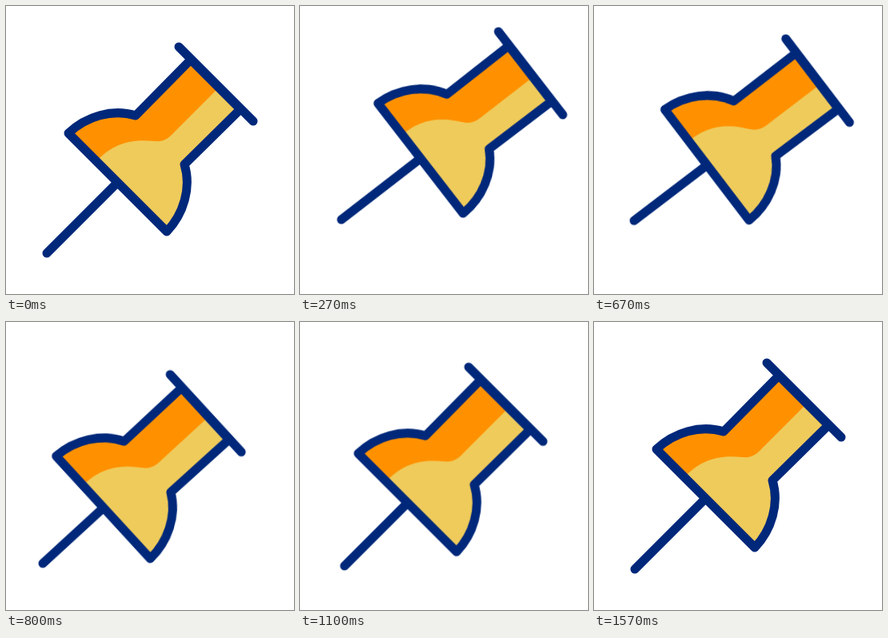
Animation of 360x360 px, one loop 2000 ms. Source, as an HTML page:

```html
<!DOCTYPE html>
<html lang="en">
<head>
<meta charset="utf-8">
<title>Push pin</title>
<style>
  html, body { margin: 0; height: 100%; overflow: hidden; background: #fff; }
  svg { display: block; width: 100vw; height: 100vh; }

  .line { fill: none; stroke: #00287a; stroke-width: 11; stroke-linecap: round; stroke-linejoin: round; }
  .spark { fill: none; stroke: #fcc550; stroke-width: 11; stroke-linecap: round; }

  .pin, .needle, .spark { animation: 2s linear infinite; }
  .pin { transform-origin: 180px 180px; animation-name: pin; }
  .needle { animation-name: needle; }
  .spark { animation-name: spark; }

  /* lift, strike, rebound, settle */
  @keyframes pin {
    0% { transform: translate(0, 0) rotate(0deg); animation-timing-function: cubic-bezier(.4, 0, .67, 1); }
    23.33%, 24% { transform: translate(27.3px, -42px) rotate(12.4deg); animation-timing-function: cubic-bezier(.36, 0, .64, 1); }
    46.67% { transform: translate(-27px, 26.5px) rotate(0deg); animation-timing-function: cubic-bezier(.33, 0, .67, 1); }
    63.33% { transform: translate(16px, -15.5px) rotate(0deg); animation-timing-function: cubic-bezier(.33, 0, .67, 1); }
    78.33%, 100% { transform: translate(0, 0) rotate(0deg); }
  }

  /* the needle slides up behind the body as it sinks in */
  @keyframes needle {
    0%, 24% { transform: translate(0, 0); animation-timing-function: cubic-bezier(.36, 0, .64, 1); }
    46.67% { transform: translate(20px, -19px); animation-timing-function: cubic-bezier(.33, 0, .67, 1); }
    63.33%, 100% { transform: translate(0, 0); }
  }

  @keyframes spark {
    0%, 43.99% { opacity: 0; stroke-dasharray: 0 200; stroke-dashoffset: 0; }
    44% { opacity: 1; stroke-dasharray: 0 200; stroke-dashoffset: 0; }
    46.5% { stroke-dasharray: 36 200; stroke-dashoffset: 0; }
    51% { stroke-dasharray: 40 200; stroke-dashoffset: -60; }
    54% { opacity: 1; stroke-dasharray: 0 200; stroke-dashoffset: -100; }
    54.01%, 100% { opacity: 0; stroke-dasharray: 0 200; stroke-dashoffset: -100; }
  }
</style>
</head>
<body>
<svg viewBox="0 0 360 360">
  <defs>
    <path id="body" d="M78 159C100 138 133 128 162 137L231 67L293 129L223 198C232 227 222 260 201 282Z"/>
  </defs>
  <path class="spark" pathLength="100" d="M36 318C34 303 29 272 38 250"/>
  <path class="spark" pathLength="100" d="M48 327C62 324 92 321 112 309"/>
  <g class="pin">
    <path class="line needle" d="M138 222L51 309"/>
    <use href="#body" fill="#efcb5b"/>
    <path fill="#ff9100" d="M78 159C100 138 133 128 162 137L231 67L266.5 101.5L210 158C203 166 196 170 186 169C160 166 135 170 113 194Z"/>
    <use href="#body" class="line"/>
    <path class="line" d="M216 51L309 144"/>
  </g>
</svg>
</body>
</html>
```
